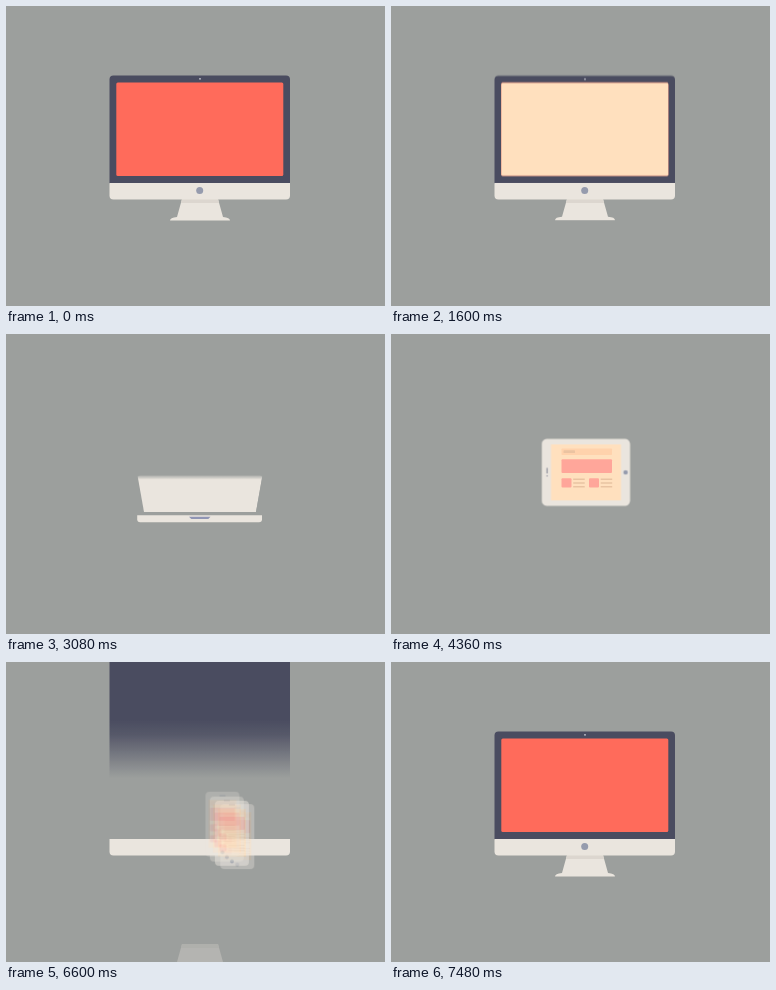
An HTML page without scripts that plays this animation: 379 by 300 pixels, repeating every 7560 ms.

```html
<!DOCTYPE html>
<html lang="en">
<head>
<meta charset="utf-8">
<title>Responsive devices</title>
<style>
  :root {
    --dark: #4a4c60; --body: #eae5de; --coral: #ff6b5b; --cream: #ffe0be;
    --bar: #ffd2ac; --item: #ebc3a1; --pink: #ffa69a; --line: #e9c3a2; --button: #959bad;
  }
  html, body { margin: 0; width: 100%; height: 100%; overflow: hidden; background: #9c9f9d; }
  .stage { position: absolute; left: 0; top: 0; width: 379px; height: 300px; overflow: hidden; }
  .stage > svg, .lid svg { display: block; }

  .dark { fill: var(--dark); }
  .body { fill: var(--body); }
  .coral { fill: var(--coral); }
  .cream { fill: var(--cream); }
  .bar { fill: var(--bar); }
  .item { fill: var(--item); }
  .pink { fill: var(--pink); }
  .button { fill: var(--button); }
  .line { stroke: var(--line); fill: none; }

  .a, .a *[class*="fx-"], .drop {
    animation: 7.56s linear infinite both;
  }

  /* desktop */
  .monitor { transform-origin: 194px 177px; animation-name: monitor !important; }
  .ghost { animation-name: ghost !important; }
  .screen-on { animation-name: screen !important; }
  .page-show { animation-name: page !important; }
  .panel { animation-name: panel !important; }
  .drop { animation-name: drop; animation-delay: var(--d, 0s); }
  .chin { transform-origin: 193.7px 184.8px; animation-name: chin !important; }
  .power { animation-name: power !important; }
  .stand { transform-origin: 194px 193px; animation-name: stand !important; }

  @keyframes monitor {
    0%, 20.9% { transform: none; opacity: 1; animation-timing-function: cubic-bezier(.6, 0, .4, 1); }
    26.5% { transform: scaleY(0); opacity: 1; }
    26.6%, 88.5% { transform: none; opacity: 0; }
    89.42%, 100% { transform: none; opacity: 1; }
  }
  @keyframes ghost {
    0%, 85.71% { transform: translateY(-230px); opacity: 1; animation-timing-function: ease-out; }
    89.42% { transform: none; opacity: 1; }
    90%, 100% { transform: none; opacity: 0; }
  }
  @keyframes screen {
    0%, 26.6% { opacity: 1; }
    26.7%, 97.5% { opacity: 0; }
    98.8%, 100% { opacity: 1; }
  }
  @keyframes page {
    0%, 26.6% { opacity: 1; }
    26.7%, 99.9% { opacity: 0; }
    100% { opacity: 1; }
  }
  @keyframes panel {
    0%, 1.2% { transform: translateY(-172px); animation-timing-function: cubic-bezier(.4, 0, .2, 1); }
    6.4%, 100% { transform: none; }
  }
  @keyframes drop {
    0%, 4.8% { transform: translateY(-180px); animation-timing-function: cubic-bezier(.3, .2, .2, 1); }
    10.58%, 100% { transform: none; }
  }
  @keyframes chin {
    0%, 26.98% { transform: none; opacity: 1; animation-timing-function: ease-in-out; }
    32.28% { transform: scale(.694, .45); opacity: 1; }
    32.3%, 82.8% { transform: translateY(-200px); opacity: 0; }
    82.9% { transform: translateY(-200px); opacity: 1; animation-timing-function: ease-out; }
    86.24%, 100% { transform: none; opacity: 1; }
  }
  @keyframes power {
    0%, 25.5% { opacity: 1; }
    27%, 88.5% { opacity: 0; }
    90.5%, 100% { opacity: 1; }
  }
  @keyframes stand {
    0%, 20.9% { transform: none; opacity: 1; animation-timing-function: ease-in; }
    24.5% { transform: scaleY(0); opacity: 1; }
    24.6%, 85.71% { transform: translateY(230px); opacity: 0; animation-timing-function: ease-out; }
    87.3% { transform: translateY(90px); opacity: .3; animation-timing-function: ease-out; }
    89.42%, 100% { transform: none; opacity: 1; }
  }

  /* laptop */
  .base { transform-origin: 193.7px 184.8px; animation-name: base !important; }
  .lid {
    position: absolute; left: 138px; top: 100px; width: 112px; height: 78px;
    transform-origin: 50% 100%; animation-name: lid;
  }
  .lid-edge { animation-name: edge !important; }
  .lid-screen { animation-name: lidscreen !important; }

  @keyframes base {
    0%, 32.28% { transform: none; opacity: 0; }
    32.3%, 52.51% { transform: none; opacity: 1; animation-timing-function: ease-in; }
    56% { transform: translateY(-19px) scaleX(.65); opacity: 1; }
    56.1%, 100% { transform: translateY(-19px) scaleX(.65); opacity: 0; }
  }
  @keyframes lid {
    0%, 37.5% { transform: perspective(683px) rotateX(-90deg); opacity: 0; }
    37.57% { transform: perspective(683px) rotateX(-90deg); opacity: 1; animation-timing-function: cubic-bezier(.65, 0, .35, 1); }
    45.3% { transform: perspective(683px) rotateX(0deg); opacity: 1; }
    52.51% { transform: none; opacity: 1; animation-timing-function: ease-in-out; }
    57.5% { transform: translate(1px, -6px) scale(.786, .859); opacity: 0; }
    100% { transform: none; opacity: 0; }
  }
  @keyframes edge {
    0%, 41% { opacity: 1; }
    44.5%, 100% { opacity: 0; }
  }
  @keyframes lidscreen {
    0%, 44.3% { opacity: 0; }
    49.21%, 100% { opacity: 1; }
  }

  /* tablet */
  .tablet { transform-origin: 195px 138.4px; animation-name: tablet !important; }
  .turn { transform-origin: 195px 138.4px; animation-name: turn !important; }
  .wide { transform-origin: 195px 138.4px; transform: rotate(90deg); animation-name: wide !important; }
  .tall { animation-name: tall !important; }

  @keyframes tablet {
    0%, 52.51% { transform: translate(-1px, 1px) scale(1.273, 1.164); opacity: 0; animation-timing-function: ease-in-out; }
    55% { transform: scale(1.14, 1.08); opacity: 1; animation-timing-function: ease-out; }
    57.5%, 72.75% { transform: none; opacity: 1; animation-timing-function: ease-in-out; }
    81.2% { transform: scale(.51, .735); opacity: 0; }
    100% { transform: none; opacity: 0; }
  }
  @keyframes turn {
    0%, 65.08% { transform: rotate(-90deg); animation-timing-function: ease-in-out; }
    69.2%, 100% { transform: none; }
  }
  @keyframes wide {
    0%, 65.4% { opacity: 1; }
    68.5%, 100% { opacity: 0; }
  }
  @keyframes tall {
    0%, 65.4% { opacity: 0; }
    68.5%, 100% { opacity: 1; }
  }

  /* phone: overlaid delayed copies give the smear while it travels */
  .phone { transform-origin: 195px 138.4px; animation-name: phone !important; }
  .move { animation-name: move !important; animation-delay: var(--d) !important; }
  .dim { animation-name: dim !important; }

  @keyframes phone {
    0%, 72.75% { transform: scale(1.97, 1.36); opacity: 0; animation-timing-function: ease-in-out; }
    78% { transform: scale(1.25, 1.1); opacity: 1; animation-timing-function: ease-out; }
    81.3%, 97.5% { transform: none; opacity: 1; }
    98.8%, 100% { transform: translateX(12px); opacity: 0; }
  }
  @keyframes move {
    0%, 83.4% { transform: none; animation-timing-function: ease-in; }
    87.3% { transform: translate(28px, 31px); }
    89.8% { transform: translate(62px, 52px); animation-timing-function: ease-out; }
    92%, 100% { transform: translate(70px, 46px); }
  }
  @keyframes dim {
    0%, 83.8% { opacity: 1; }
    86.5%, 89% { opacity: .35; }
    91.5%, 100% { opacity: 1; }
  }
</style>
</head>
<body>
<div class="stage">
  <svg width="379" height="300" viewBox="0 0 379 300">
    <defs>
      <linearGradient id="smear" x1="0" y1="0" x2="0" y2="1">
        <stop offset="0" stop-color="#4a4c60"/>
        <stop offset=".25" stop-color="#4a4c60" stop-opacity=".85"/>
        <stop offset="1" stop-color="#4a4c60" stop-opacity="0"/>
      </linearGradient>
      <g id="content">
        <g class="drop" style="--d:.16s">
          <rect class="bar" x="120" y="82" width="148" height="9.5" rx="1"/>
          <rect class="item" x="124.5" y="85" width="18.5" height="4" rx="1"/>
          <rect class="item" x="243" y="85" width="19" height="4" rx="1"/>
        </g>
        <rect class="drop pink" style="--d:.1s" x="120" y="97" width="148" height="37" rx="1.5"/>
        <g class="drop" style="--d:.05s">
          <rect class="pink" x="120" y="144.3" width="20.5" height="19.7" rx="1.5"/>
          <path class="line" stroke-width="2" d="M146.5 146.3h41m-41 7.5h41m-41 7.5h41"/>
        </g>
        <g class="drop">
          <rect class="pink" x="200" y="144" width="20.5" height="19.7" rx="1.5"/>
          <path class="line" stroke-width="2" d="M226.5 146h41m-41 7.5h41m-41 7.5h41"/>
        </g>
      </g>
      <g id="handset">
        <rect class="body" x="178" y="106" width="34" height="65" rx="4"/>
        <rect class="cream" x="181" y="114" width="28" height="48"/>
        <rect class="bar" x="182.5" y="115.5" width="25" height="4"/>
        <rect class="pink" x="182.5" y="122" width="25" height="13" rx="1"/>
        <rect class="pink" x="182.5" y="138.5" width="7" height="7" rx="1"/>
        <rect class="pink" x="182.5" y="149.5" width="7" height="7" rx="1"/>
        <path class="line" d="M191.5 139.5h16m-16 2.6h16m-16 2.6h16M191.5 150.5h16m-16 2.6h16m-16 2.6h16"/>
        <circle class="button" cx="195" cy="166.5" r="1.9"/>
        <path stroke="#959bad" d="M192 110h6"/>
      </g>
    </defs>

    <g class="a stand">
      <path class="body" d="M176 193h36l5 18q7 .5 7 3.500h-60q0-3 7-3.500z"/>
      <path fill="#dcd6cf" d="M176 193h36l1 4h-38z"/>
    </g>
    <g class="a ghost">
      <rect class="dark" x="103.500" y="-200" width="180.500" height="348"/>
      <rect x="103.500" y="148" width="180.500" height="58" fill="url(#smear)"/>
    </g>
    <g class="a monitor">
      <path class="dark" d="M103.500 177.500V73.500q0-4 4-4H280q4 0 4 4V177.500z"/>
      <circle cx="194" cy="72.800" r=".9" fill="#c9cad2"/>
      <rect class="a screen-on coral" x="110.300" y="76.500" width="167" height="93.500" rx="1.500"/>
      <g class="a page-show">
        <rect class="a panel cream" x="110.300" y="76.500" width="167" height="93.500" rx="1.500"/>
        <use href="#content"/>
      </g>
    </g>
    <g class="a chin">
      <path class="body" d="M103.500 177H284v12.500q0 4-4 4H107.500q-4 0-4-4z"/>
      <circle class="a power button" cx="193.700" cy="184.500" r="3.500"/>
    </g>

    <g class="a base">
      <path class="body" d="M131.200 181.200H256v4q0 3-3 3H134.200q-3 0-3-3z"/>
      <path fill="#9095b4" d="M183 182.800h21.500l-2.200 2.300h-17z"/>
    </g>

    <g class="a tablet">
      <g class="a turn">
        <rect class="body" x="161.500" y="94.300" width="67" height="88.200" rx="5"/>
        <rect class="cream" x="167" y="103.400" width="56" height="70"/>
        <circle class="button" cx="195" cy="178" r="2.200"/>
        <path stroke="#8d8f9b" stroke-width="1.200" d="M194 99.500h5.500"/>
        <circle cx="191.500" cy="99.500" r=".7" fill="#8d8f9b"/>
        <g class="a wide">
          <rect class="bar" x="170.500" y="114.500" width="50.500" height="6.500" rx=".7"/>
          <rect class="item" x="172.500" y="116.300" width="11.500" height="2.800" rx=".7"/>
          <rect class="pink" x="170.500" y="125.200" width="50.500" height="13.800" rx="1"/>
          <rect class="pink" x="170.500" y="144.200" width="10" height="9.300" rx="1"/>
          <rect class="pink" x="198" y="144.200" width="10" height="9.300" rx="1"/>
          <path class="line" stroke-width="1.400" d="M182.200 145.300h11.500m-11.500 3.700h11.500m-11.500 3.700h11.500M209.700 145.300h11.500m-11.500 3.700h11.500m-11.500 3.700h11.500"/>
        </g>
        <g class="a tall">
          <rect class="bar" x="169.500" y="105" width="49.700" height="5.800" rx=".7"/>
          <rect class="item" x="171.300" y="106.600" width="11.500" height="2.600" rx=".7"/>
          <rect class="item" x="206" y="106.600" width="11.300" height="2.600" rx=".7"/>
          <rect class="pink" x="169.500" y="114.700" width="49.700" height="24" rx="1"/>
          <rect class="pink" x="169.500" y="144" width="10.200" height="9.200" rx="1"/>
          <rect class="pink" x="169.500" y="159" width="10.200" height="9.200" rx="1"/>
          <path class="line" stroke-width="1.500" d="M181.500 145h38m-38 3.700h38m-38 3.700h38M181.500 160h38m-38 3.700h38m-38 3.700h38"/>
        </g>
      </g>
    </g>

    <g class="a phone">
      <g class="a dim"><use class="a move" style="--d:-.045s" href="#handset"/></g>
      <g opacity=".5"><use class="a move" style="--d:-.015s" href="#handset"/></g>
      <g opacity=".33"><use class="a move" style="--d:.015s" href="#handset"/></g>
      <g opacity=".25"><use class="a move" style="--d:.045s" href="#handset"/></g>
    </g>
  </svg>

  <div class="a lid">
    <svg width="112" height="78" viewBox="138 100 112 78">
      <defs>
        <linearGradient id="soft" x1="0" y1="0" x2="0" y2="1">
          <stop offset="0" stop-color="#9c9f9d" stop-opacity=".8"/>
          <stop offset="1" stop-color="#9c9f9d" stop-opacity="0"/>
        </linearGradient>
      </defs>
      <path class="body" d="M138 178V103q0-3 3-3H247q3 0 3 3V178z"/>
      <rect class="a lid-edge" x="138" y="100" width="112" height="8" fill="url(#soft)"/>
      <g class="a lid-screen">
        <rect class="cream" x="142" y="105" width="104" height="70"/>
        <use href="#content" transform="translate(73.500 47.700) scale(.623 .749)"/>
      </g>
    </svg>
  </div>
</div>
</body>
</html>
```
